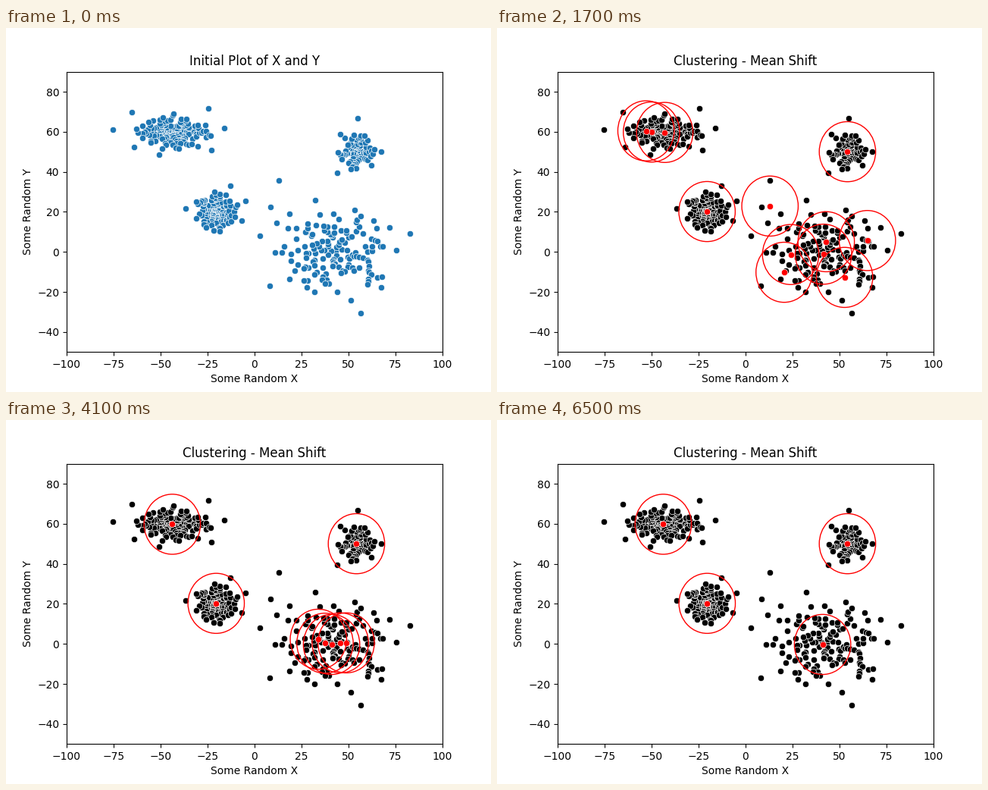
A matplotlib script that plays this animation: 640 by 480 pixels, repeating every 8000 ms.

```python
import numpy as np
import matplotlib.pyplot as plt
from matplotlib.animation import FuncAnimation
from matplotlib.collections import EllipseCollection

RADIUS = 15
GRID = 5
MERGE_GAP = 2.5
INTERVAL = 100
FRAMES = 80
INTRO_FRAMES = 5
FRAMES_PER_STEP = 4
LAST_STEP = 15
GOLDEN_ANGLE = np.pi * (3 - np.sqrt(5))

rng = np.random.default_rng(7)


def blob(count, center, spread, reach):
    """Evenly filled normal cloud, cut off at `reach` standard deviations."""
    order = np.arange(count)
    level = (order + rng.random(count)) / count
    r = np.sqrt(-2 * np.log(1 - level * (1 - np.exp(-reach**2 / 2))))
    angle = order * GOLDEN_ANGLE + rng.uniform(0, 1.2, count)
    unit = np.column_stack([r * np.cos(angle), r * np.sin(angle)])
    return np.array(center) + unit * spread


# Outliers that set the data range and steer the outer centroids
STRAYS = [
    (-75.3, 61.2), (-65.5, 69.7), (-64, 52.3), (-24.5, 71.6), (-16, 62),
    (-23, 51), (-50.7, 48.6),
    (-36.6, 21.6), (-12.8, 33), (-4.7, 25.5), (-6.7, 15.6), (-9.3, 23.5),
    (55, 66.7), (45.6, 58.8), (44, 39.4), (67.5, 50),
    (13, 35.5), (8.5, 22.5), (11.8, 14.5), (18.7, 19), (3, 8), (8, -17),
    (10.7, -0.3), (32.3, 25.8), (71.8, 12.2), (82.7, 9.2), (75.5, 1),
    (67.4, -17.8), (56.5, -30.7), (51.2, -24.2),
]

points = np.vstack([
    blob(140, (-43.1, 59.8), (9.5, 4.2), 2.2),
    blob(125, (-20.9, 20.1), (5.5, 5), 2.1),
    blob(80, (54.5, 49.8), (5.3, 4.8), 2),
    blob(135, (42.4, 0), (16, 11.5), 1.95),
    STRAYS,
])


def shift(centroids):
    """Move each centroid to the mean of its neighbours, then merge."""
    moves = []
    for spot in centroids:
        near = np.hypot(*(points - spot).T) <= RADIUS
        if near.any():
            target = points[near].mean(axis=0)
            moves.append((np.hypot(*(target - spot)), target))
    # The most settled centroid of a close group is the one that stays.
    kept = []
    for _, target in sorted(moves, key=lambda move: move[0]):
        if all(np.hypot(*(target - other)) > MERGE_GAP for other in kept):
            kept.append(target)
    return np.array(kept)


axes_ticks = np.linspace(points.min(axis=0), points.max(axis=0), GRID).T
steps = [np.array([(x, y) for x in axes_ticks[0] for y in axes_ticks[1]])]
for _ in range(LAST_STEP):
    steps.append(shift(steps[-1]))

fig, ax = plt.subplots(figsize=(6.4, 4.8), dpi=100)
ax.set(xlim=(-100, 100), ylim=(-50, 90),
       xlabel="Some Random X", ylabel="Some Random Y")
title = ax.set_title("")

marker = dict(s=36, edgecolors="white", linewidths=0.48)
dots = ax.scatter(*points.T, **marker)
centers = ax.scatter([], [], c="red", **marker)
rings = EllipseCollection([2 * RADIUS], [2 * RADIUS], [0], units="xy",
                          offsets=steps[0], offset_transform=ax.transData,
                          facecolors="none", edgecolors="red", linewidths=1)
ax.add_collection(rings, autolim=False)


def draw(frame):
    clustering = frame >= INTRO_FRAMES
    title.set_text("Clustering - Mean Shift" if clustering
                   else "Initial Plot of X and Y")
    dots.set_facecolor("black" if clustering else "#1f77b4")
    for artist in (centers, rings):
        artist.set_visible(clustering)
        if clustering:
            step = (frame - INTRO_FRAMES) // FRAMES_PER_STEP
            artist.set_offsets(steps[min(step, LAST_STEP)])
    return title, dots, centers, rings


anim = FuncAnimation(fig, draw, frames=FRAMES, interval=INTERVAL,
                     repeat=True, repeat_delay=0)
plt.show()
```
